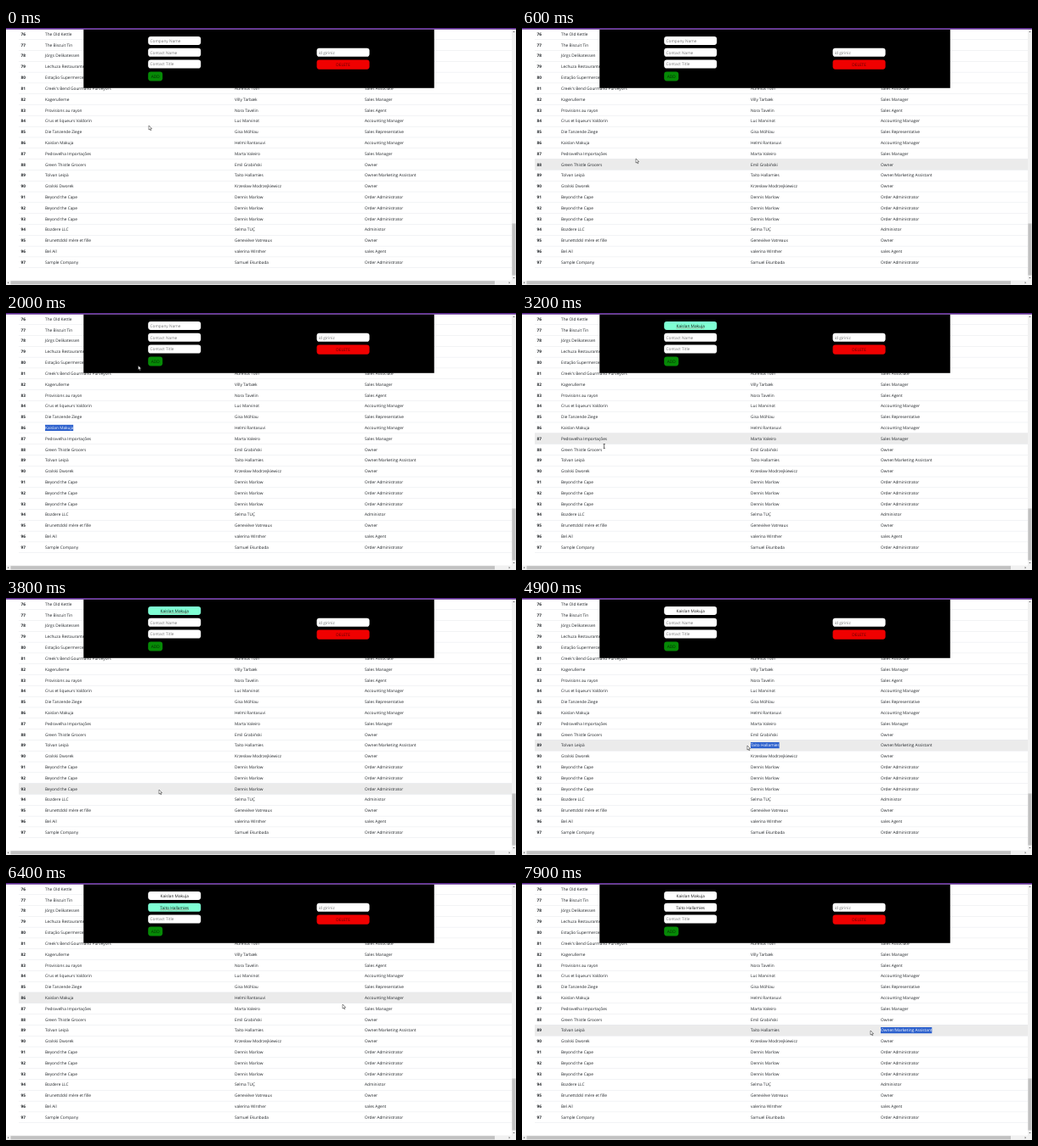
Animation of 600 by 303 pixels, one loop 8 s. Source, as an HTML page with a canvas:

```html
<!DOCTYPE html>
<html lang="en">
<head>
<meta charset="utf-8">
<title>Customer table</title>
<style>
html, body { margin: 0; width: 100%; height: 100%; overflow: hidden; background: #fff; }
canvas { display: block; width: 600px; height: 303px; }
</style>
</head>
<body>
<canvas id="stage"></canvas>
<script>
const canvas = document.getElementById('stage');
const dpr = window.devicePixelRatio || 1;
canvas.width = 600 * dpr;
canvas.height = 303 * dpr;
const ctx = canvas.getContext('2d');

const LOOP = 8000, STEP = 100;
const ZOOM = 0.3125;              // page pixels to stage pixels
const ROW_H = 41 * ZOOM, TOP = 0.65;
const COLS = [46, 269, 422];
const PANEL = { x: 91.25, y: 1.6, w: 412.5, h: 69.2 };
const FAMILY = '"Open Sans", "Noto Sans", sans-serif';
const INK = '#212529';

const rows = `The Old Kettle||
The Biscuit Tin||
Jörgs Delikatessen||
Lechuza Restaurante||
Estação Supermercearias||
Creek's Bend Gourmand Purveyors|Aurelius Toth|Sales Associate
Kagerullerne|Villy Tarbæk|Sales Manager
Provisions au rayon|Nora Tavelin|Sales Agent
Crus et liqueurs Valdorin|Luc Marvinot|Accounting Manager
Die Tanzende Ziege|Gisa Möhlau|Sales Representative
Kaislan Makuja|Helmi Rantasuvi|Accounting Manager
Pedravelha Importações|Marta Valeiro|Sales Manager
Green Thistle Grocers|Emil Grabiński|Owner
Tolvan Leipä|Taito Hallamies|Owner/Marketing Assistant
Gralski Dworek|Krzesław Modrzejkiewicz|Owner
Beyond the Cape|Dennis Marlow|Order Administrator
Beyond the Cape|Dennis Marlow|Order Administrator
Beyond the Cape|Dennis Marlow|Order Administrator
Bozdere LLC|Selma TUÇ|Administor
Brunettddsl mère et fille|Geneviève Vatreaux|Owner
Bel Ail|valerina WInther|sales Agent
Sample Company|Samuel Ekunbada|Order Administrator`.split('\n').map(r => r.split('|'));

// Pointer stops: x, y, arrival, departure
const stops = [
  [168, 115, 0, 0],
  [130, 168, 400, 400],
  [134, 154, 600, 600],
  [81, 135.5, 1300, 1300],
  [45, 136, 1600, 1700],
  [155.5, 62, 2000, 2000],
  [188, 16, 2400, 2800],
  [96.7, 157, 3200, 3200],
  [180, 226, 3800, 3800],
  [305, 174, 4400, 4500],
  [265, 174, 4800, 5000],
  [196, 28, 5600, 6000],
  [396, 143, 6400, 6400],
  [440, 204, 6700, 6700],
  [483, 174, 7300, 7300],
  [410, 174, 7800, LOOP]
];

// Text selections, dragged from the right end leftwards
const drags = [
  { row: 10, col: 0, from: 1300, to: 1600, clear: 2400 },
  { row: 13, col: 1, from: 4500, to: 4800, clear: 5600 },
  { row: 13, col: 2, from: 7300, to: 7800, clear: LOOP }
];

const FIELD_W = 62, FIELD_H = 10, FIELD_GAP = 13.85;
const fields = [
  { hint: 'Company Name', value: rows[10][0], focus: 2400, paste: 2700, blur: 4500 },
  { hint: 'Contact Name', value: rows[13][1], focus: 5600, paste: 5900, blur: 7300 },
  { hint: 'Contact Title' }
].map((f, i) => ({ ...f, x: 167.2, y: 9.9 + i * FIELD_GAP }));
fields.push({ hint: 'id giriniz', x: 365.6, y: 9.9 + FIELD_GAP });

const easeOut = k => 1 - (1 - k) ** 2.5;
const rowTop = i => TOP + i * ROW_H;

function pointer(t) {
  const i = stops.findIndex(s => s[3] > t);
  const [x1, y1, arrive] = stops[i];
  if (t >= arrive) return [x1, y1];
  const [x0, y0, , leave] = stops[i - 1];
  const k = easeOut((t - leave) / (arrive - leave));
  return [x0 + (x1 - x0) * k, y0 + (y1 - y0) * k];
}

function setFont(weight = 400) {
  ctx.font = `${weight} 15.3px ${FAMILY}`;
  ctx.textRendering = 'geometricPrecision';
}

function textWidth(s) {
  setFont();
  return ctx.measureText(s).width * ZOOM;
}

function text(s, x, y, color = INK, align = 'left', weight = 400) {
  ctx.save();
  ctx.translate(x, y);
  ctx.scale(ZOOM, ZOOM);
  setFont(weight);
  ctx.textAlign = align;
  ctx.fillStyle = color;
  ctx.fillText(s, 0, 0);
  ctx.restore();
}

function rect(x, y, w, h, color) {
  ctx.fillStyle = color;
  ctx.fillRect(x, y, w, h);
}

function pill(x, y, w, h, color) {
  ctx.beginPath();
  ctx.roundRect(x, y, w, h, 3.1);
  ctx.fillStyle = color;
  ctx.fill();
}

const inside = (x, y, b) => x > b.x && x < b.x + b.w && y > b.y && y < b.y + b.h;

function rowAt(x, y) {
  if (x < 15 || x > 595 || inside(x, y, PANEL)) return -1;
  const i = Math.floor((y - TOP) / ROW_H);
  return i < rows.length ? i : -1;
}

function overText(x, y) {
  if (fields.some(f => inside(x, y, { x: f.x, y: f.y, w: FIELD_W, h: FIELD_H }))) return true;
  const i = rowAt(x, y);
  return i >= 0 && COLS.some((c, k) => x >= c && x <= c + textWidth(rows[i][k]) + 1);
}

function drawTable(hover) {
  rows.forEach((cells, i) => {
    const y = rowTop(i);
    if (i === hover) rect(15, y, 580, ROW_H, '#ebebeb');
    rect(15, y, 580, 0.4, '#dee2e6');
    text(String(76 + i), 17.4, y + 8.2, INK, 'left', 700);
    cells.forEach((s, k) => text(s, COLS[k], y + 8.2));
  });
  rect(15, rowTop(rows.length), 580, 0.4, '#dee2e6');
}

function drawSelection(t) {
  const d = drags.find(d => t >= d.from && t < d.clear);
  if (!d) return;
  const s = rows[d.row][d.col], x = COLS[d.col], y = rowTop(d.row);
  const px = pointer(Math.min(t, d.to))[0];
  let n = 0;
  while (n < s.length && x + textWidth(s.slice(0, n + 1)) < px + 0.6) n++;
  const left = x + textWidth(s.slice(0, n)), width = x + textWidth(s) - left;
  ctx.save();
  ctx.beginPath();
  ctx.rect(left, y + 2.8, width, 7.5);
  ctx.clip();
  rect(left, y + 2.8, width, 7.5, '#2d61cd');
  text(s, x, y + 8.2, '#fff');
  ctx.restore();
}

function squiggle(cx, y, w) {
  ctx.beginPath();
  for (let x = -w / 2; x <= w / 2; x += 0.4) ctx.lineTo(cx + x, y + 0.35 * Math.sin(x * 3.4));
  ctx.strokeStyle = '#c0303a';
  ctx.lineWidth = 0.4;
  ctx.stroke();
}

function drawField(f, t) {
  const focused = t >= f.focus && t < f.blur;
  pill(f.x, f.y, FIELD_W, FIELD_H, focused ? '#7fffd4' : '#fff');
  const base = f.y + 6.75;
  if (t >= f.paste) {
    const cx = f.x + FIELD_W / 2;
    text(f.value, cx, base, '#111', 'center');
    if (focused) squiggle(cx, base + 1.3, textWidth(f.value));
  } else {
    text(f.hint, f.x + 2.3, base, '#757575');
  }
}

function drawPanel(t) {
  rect(PANEL.x, PANEL.y, PANEL.w, PANEL.h, '#000');
  fields.forEach(f => drawField(f, t));
  pill(167.2, 51.6, 17, 10.8, '#068a06');
  text('ADD', 175.7, 58.7, '#042a04', 'center');
  pill(365.6, 37.5, FIELD_W, 11.2, '#f00000');
  text('DELETE', 396.6, 44.8, '#5c0000', 'center');
}

// Scrollbar arrow head, turned by quarter turns from pointing up
function arrowHead(x, y, turns) {
  ctx.save();
  ctx.translate(x, y);
  ctx.rotate(turns * Math.PI / 2);
  ctx.beginPath();
  ctx.moveTo(0, -0.7);
  ctx.lineTo(1.2, 0.6);
  ctx.lineTo(-1.2, 0.6);
  ctx.fillStyle = '#606060';
  ctx.fill();
  ctx.restore();
}

function drawChrome() {
  rect(595, 0, 5, 303, '#f1f1f1');
  rect(0, 297.6, 600, 5.4, '#f1f1f1');
  rect(595.4, 230.5, 4.2, 61, '#c1c1c1');
  rect(5.5, 298.2, 569.5, 4.2, '#c1c1c1');
  arrowHead(597.5, 4.4, 0);
  arrowHead(592.3, 300.3, 1);
  arrowHead(597.5, 294.6, 2);
  arrowHead(2.5, 300.3, 3);
  rect(0, 0, 600, 1.7, '#5f2d91');
}

function drawArrow(x, y) {
  ctx.beginPath();
  [[0, 0], [0, 5.1], [1.2, 4], [2, 5.9], [2.8, 5.5], [2, 3.7], [3.6, 3.6]]
    .forEach(([dx, dy]) => ctx.lineTo(x + dx, y + dy));
  ctx.closePath();
  ctx.fillStyle = '#fff';
  ctx.fill();
  ctx.strokeStyle = '#111';
  ctx.lineWidth = 0.45;
  ctx.stroke();
}

function drawBeam(x, y) {
  rect(x - 0.25, y - 2.6, 0.6, 5.2, '#111');
  for (const dy of [-2.8, 2.3]) rect(x - 1.1, y + dy, 2.3, 0.5, '#111');
}

function draw(t) {
  ctx.setTransform(dpr, 0, 0, dpr, 0, 0);
  rect(0, 0, 600, 303, '#fff');
  // The page reacts one step behind the pointer
  const late = t >= STEP ? pointer(t - STEP) : null;
  drawTable(late ? rowAt(...late) : -1);
  drawSelection(t);
  drawPanel(t);
  drawChrome();
  const cursor = late && overText(...late) ? drawBeam : drawArrow;
  cursor(...pointer(t));
}

const start = performance.now();
function tick(now) {
  const t = Math.max(0, now - start) % LOOP;
  draw(Math.floor(t / STEP) * STEP);
  requestAnimationFrame(tick);
}
draw(0);
requestAnimationFrame(tick);
</script>
</body>
</html>
```
